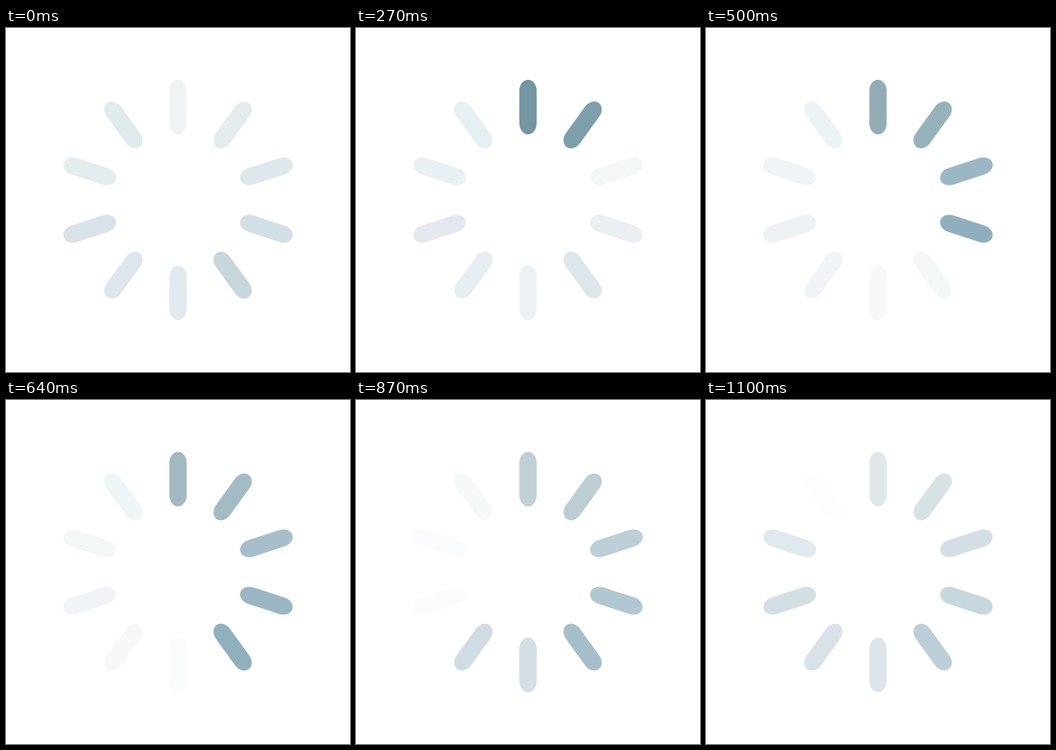
These frames come from a looping animation (430x430 px, 1200 ms). An HTML page with a canvas:

```html
<!DOCTYPE html>
<html lang="en">
<head>
<meta charset="utf-8">
<title>Spinner</title>
<style>
  html, body { margin: 0; width: 100%; height: 100%; overflow: hidden; background: #fff; }
  canvas { display: block; }
</style>
</head>
<body>
<canvas id="stage" width="430" height="430"></canvas>
<script>
const ctx = document.getElementById('stage').getContext('2d');
const LOOP = 1200;
const STEP_STARTS = [0, 130, 270, 370, 500, 600, 740, 870, 970, 1100];
// Bar colours when freshly lit, clockwise from the top.
const COLORS = ['#648b96', '#7c9faa', '#91b0bd', '#90afbe', '#8fb0bd',
                '#cfdbe3', '#d0dbe4', '#d0dbe3', '#e0eaee', '#e0ebee'];
const COUNT = COLORS.length;
const BAR = { width: 21.6, inner: 82, outer: 150.3 };

function drawBar(index, alpha) {
  const length = BAR.outer - BAR.inner;
  ctx.save();
  ctx.translate(215, 215);
  ctx.rotate(index * 2 * Math.PI / COUNT);
  ctx.globalAlpha = alpha;
  ctx.fillStyle = COLORS[index];
  ctx.beginPath();
  ctx.roundRect(-BAR.width / 2, -BAR.outer, BAR.width, length,
                { x: BAR.width / 2, y: length * 0.2 });
  ctx.fill();
  ctx.restore();
}

function draw(time) {
  const step = STEP_STARTS.findLastIndex(start => start <= time);
  ctx.fillStyle = '#fff';
  ctx.fillRect(0, 0, 430, 430);
  for (let i = 0; i < COUNT; i++) {
    const age = (step - 1 - i + 2 * COUNT) % COUNT;
    drawBar(i, 1 - age / COUNT);
  }
}

const origin = performance.now();
function tick() {
  draw((performance.now() - origin) % LOOP);
  requestAnimationFrame(tick);
}
tick();
</script>
</body>
</html>
```
